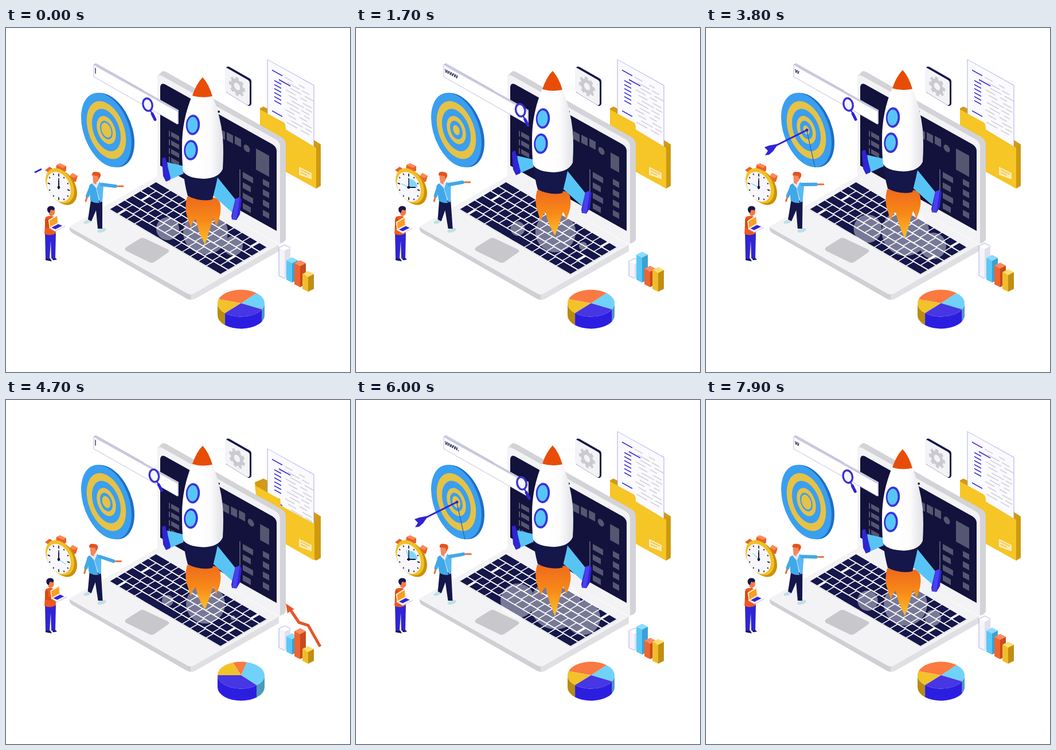
These frames come from a looping animation (600 px wide and 600 px high, 8 s). An HTML page with a canvas:

```html
<!DOCTYPE html>
<html lang="en">
<head>
<meta charset="utf-8">
<title>Launch</title>
<style>
html, body { margin: 0; width: 100%; height: 100%; overflow: hidden; background: #fff; }
canvas { display: block; width: 600px; height: 600px; }
</style>
</head>
<body>
<canvas id="stage" width="600" height="600"></canvas>
<script>
const g = document.getElementById('stage').getContext('2d');
const TAU = Math.PI * 2, NAVY = '#15164a', INDIGO = '#2f24d6';
const { sin, cos, min, max, abs, floor, ceil, sqrt } = Math;

const fill = (color, d) => { g.fillStyle = color; g.fill(new Path2D(d + 'Z')); };
function line(color, width, d) {
  g.strokeStyle = color;
  g.lineWidth = width;
  g.stroke(new Path2D(d));
}
function oval(color, x, y, rx, ry, turn = 0) {
  g.fillStyle = color;
  g.beginPath();
  g.ellipse(x, y, rx, ry, turn, 0, TAU);
  g.fill();
}
function within(matrix, draw) {
  g.save();
  g.transform(...matrix);
  draw();
  g.restore();
}
const shift = (x, y, draw) => within([1, 0, 0, 1, x, y], draw);

function smooth(u) {
  u = min(1, max(0, u));
  return u * u * (3 - 2 * u);
}
// Rises to 1 around a moment and falls back to 0 at distance w.
const bump = (t, at, w) => smooth(1.6 * (1 - abs(t - at) / w));
const mix = (a, b, u) => a + (b - a) * u;
// Two swings in four seconds that settle at the ends.
const wave = c => cos(Math.PI * (c - .85)) * sqrt(sin(c * TAU / 8));

function paper(y) {
  within([1, .555, 0, 1, 456, y], () => {
    g.fillStyle = '#fafaff';
    g.fillRect(0, 0, 81, 112);
    g.strokeStyle = '#9a94ea';
    g.lineWidth = .8;
    g.strokeRect(0, 0, 81, 112);
    const dash = (c, x, row, w) => { g.fillStyle = c; g.fillRect(x, row, w, 1.8); };
    dash(INDIGO, 8, 13, 18);
    dash(INDIGO, 20, 23, 20);
    dash(INDIGO, 8, 84, 18);
    for (let i = 0; i < 12; i++) {
      const row = 13 + i * 7, x = 30 + i * 5 % 13;
      dash('#cfcfd6', x, row, 14 + i * 7 % 9);
      dash('#cfcfd6', x + 25, row, 10 + i * 3 % 7);
      if (i > 1 && i < 8) dash(INDIGO, 12, row + 2, 12);
    }
  });
}

function folder(t) {
  const open = bump(t % 2, .85, .7);
  const x = -9 * open, y = 7 * open;
  fill('#d49a14', `M${443 + x} ${140 + y / 2}L449 137L457 141L460 146L549 203V275L541 280L443 225`);
  paper(55 + 30 * open);
  fill('#f6c526', `M${443 + x} ${142 + y}L${485 + x} ${165 + y}Q${488 + x} 167 ${488 + x} ${177 + y}L${541 + x / 3} ${209 + y}V280L443 226`);
  fill('#cd9a10', `M${541 + x / 3} ${209 + y}L549 204V275L541 280`);
  fill('#fbeab0', 'M511 242L533 253V264L511 256');
  line('#f0c444', 1.5, 'M514 247L530 255M514 252L525 257');
}

function gearTile(t) {
  fill(NAVY, 'M384 69Q386 66 390 68L425 88Q428 90 428 94V132Q427 136 423 136L384 112');
  fill('#f3f3f8', 'M382 72Q382 68 386 70L421 90Q425 92 425 96V132Q424 136 420 134L386 113Q382 110 382 106');
  within([.87, .45, 0, 1, 403, 102], () => {
    g.rotate(t * TAU / 16);
    g.fillStyle = '#cbcbcf';
    for (let i = 0; i < 8; i++) {
      g.fillRect(-3, -16, 6, 8);
      g.rotate(TAU / 8);
    }
    oval('#cbcbcf', 0, 0, 12.5, 12.5);
    oval('#f3f3f8', 0, 0, 6, 6);
  });
}

function screen(t) {
  fill('#12123c', 'M269 103Q270 95 277 98L465 203Q472 208 472 214V354L269 240');
  oval('#12123c', 371, 146, 2, 2);
  const s = bump(t % 4, 1.35, 1.3);
  within([1, .55, 0, 1, 269, 98], () => {
    g.fillStyle = '#55566f';
    const box = (x, y, w, h) => g.fillRect(x - 269, y - 98 - .55 * (x - 269), w, h);
    for (let i = 0; i < 3; i++) box(371 + 14 * i + 8 * s, 175 + 6.5 * i + 4.5 * s, 11, 14);
    oval('#55566f', 151 + 8 * s, 29, 5.5, 6);
    box(436 + 8 * s, 210 + 7 * s, 23 - 8 * s, 37 - 10 * s);
    for (let i = 0; i < 4; i++) {
      box(288, 181 + i * 15, 14, 8);
      box(284, 179 + i * 15, 2, 10);
      box(413, 251 + i * 18, i % 2 ? 14 : 18, 10);
      box(448, 263 + i * 18, 11, 10);
    }
    box(407, 246, 2, 50);
  });
}

function laptop(t) {
  fill('#cfcfd4', 'M111 347L322 464L476 377V389L330 472Q322 476 315 472L115 357Q111 354 111 351');
  fill('#e0e0e4', 'M322 464L476 377V389L330 472Q326 474 322 474');
  fill('#f3f3f5', 'M113 345L265 258L476 378L328 463Q322 466 316 463L113 349Q110 347 113 345');
  fill('#d3d3d8', 'M264 84L272 76Q275 74 280 77L480 190Q488 195 488 203V368Q488 373 478 376');
  fill('#f3f3f5', 'M264 88Q264 79 273 84L470 194Q478 199 478 208V378L264 258');
  screen(t);

  // Keyboard plane: x runs to the right, y to the front.
  within([194, 114, -82, 48, 262, 268], () => {
    g.fillStyle = '#d6d6dc';
    g.fillRect(0, 0, 1.005, 1.01);
    g.fillStyle = '#fff';
    g.fillRect(0, 0, 1, 1);
    g.fillStyle = NAVY;
    for (let r = 0; r < 6; r++) {
      for (let c = 0; c < 14; c++) {
        const x = c / 14 + (r % 3 - 1) * .012 * (c > 0 && c < 13);
        g.fillRect(x + .004, r / 6 + .013, .0635, .143);
      }
    }
    g.fillRect(.28, .846, .3, .143);
  });
  fill('#c8c8cc', 'M210 382L234 367Q238 365 242 367L282 386Q287 389 282 392L259 408Q254 411 249 408L210 389Q205 386 210 382');
}

function smoke(p) {
  const s = sin(p * TAU);
  g.fillStyle = '#ffffff6c';
  g.beginPath();
  for (const [x, y, r] of [[282, 350, 20 + 10 * s], [348, 356, 39 + 5 * s], [396, 380, 17 + 13 * s]]) {
    g.moveTo(x + r, y);
    g.arc(x, y, r, 0, TAU);
  }
  g.fill();
}

function searchBar(t) {
  const c = t % 4;
  fill('#c9c9dc', 'M153 64L156 62L301 143V167L299 168');
  fill('#fff', 'M153 65L299 146V168L153 85');
  line('#a5a2dc', .7, 'M299 168L153 85V64L157 62L240 109');
  const n = min(max(0, floor((c - .6) / .3)), ceil((4 - c) * 3));
  within([.88, .46, 0, 1, 155, 77], () => {
    g.fillStyle = NAVY;
    g.font = 'bold 11px "Liberation Sans", Arial, sans-serif';
    const text = 'www.'.slice(0, n);
    g.fillText(text, 0, 0);
    if (n == 0 || n == 3 && c >= 3) g.fillRect(g.measureText(text).width + .5, -8, 1.4, 10);
  });

  const x = 268 - 21 * cos(t * TAU / 4);
  g.lineCap = 'round';
  shift(x, 132 + ((x - 258) / 8.5) ** 2, () => {
    oval('#f4f6ff', 0, 0, 8, 11, -.25);
    g.strokeStyle = '#3a30d4';
    g.lineWidth = 3.4;
    g.stroke();
    line('#3a30d4', 2.5, 'M5 11L8 15');
    line(INDIGO, 5, 'M8 16L13 26');
  });
  g.lineCap = 'butt';
}

function target(p) {
  const pulse = cos(p * TAU);
  within([45, 22, 0, 61, 179, 178], () => oval('#1f6fc4', 0, 0, 1, 1));
  within([44, 22, 0, 61, 175, 178], () => {
    [1, .78, .57, .38, .25, .16 + .04 * pulse].forEach((r, i) =>
      oval(i % 2 ? '#e6c246' : '#3a9ff0', 0, 0, r, r));
  });

  const s = p * 8 / 3;
  if (s > 1.3) return;
  const tip = smooth(s / .25), tail = smooth(s / .32);
  const x = mix(45, 105, tail), y = mix(254, 213, tail);
  const tx = mix(62, 176, tip), ty = mix(246, 178, tip);
  if (tip > .9) line('#2468b8', 1.2, 'M176 180L190 243');
  line(INDIGO, 3, `M${x + 5} ${y - 2}L${tx} ${ty}`);
  oval(INDIGO, tx, ty, 2.5 * tip, 2.5 * tip);
  within([tail, 0, 0, tail, x, y], () => fill(INDIGO, 'M-3 -5L5 -8L21 -11L12 2L5 8L-2 9L3 1'));
}

function stopwatch(t) {
  const c = t % 4, a = .25 * bump(c, 2.3, 1.5);
  fill('#e8602c', 'M88 239L94 236L105 241V249L99 252L87 247M68 248L76 242L81 245L74 252M111 258L116 253L125 258L122 268L117 269');
  fill('#ff8a52', 'M88 239L94 236L105 241L99 244M111 258L116 253L125 258L119 262');
  within([25, 10, 0, 29, 99, 278], () => oval('#c99208', 0, 0, 1, 1));
  within([25, 10, 0, 29, 94, 275], () => oval('#f2c024', 0, 0, 1, 1));
  within([21, 7, 0, 25, 92, 277], () => {
    oval('#f7f7fb', 0, 0, 1, 1);
    g.fillStyle = NAVY;
    for (let i = 0; i < 12; i++) {
      g.fillRect(-.04, -.92, .08, i % 3 ? .1 : .2);
      g.rotate(TAU / 12);
    }
  });
  shift(92, 278, () => {
    g.fillStyle = '#7fd8f4';
    g.beginPath();
    g.moveTo(0, 0);
    g.arc(0, 0, 15, -TAU / 4, (a - .25) * TAU);
    g.fill();
    line('#4cc0ee', 1, `M0 0L${14 * sin(c * 3)} ${-17 * cos(c * 3)}`);
    line(NAVY, 1.5, 'M0 0V-16');
    g.rotate(a * TAU);
    line(NAVY, 2, 'M0 3V-12');
    oval(NAVY, 0, 0, 2.4, 2.4);
  });
}

function presenter(t) {
  const c = t % 4, lean = -2 - 4.5 * cos((c - 1.3) * TAU / 4), hand = 276 + 8 * wave(c);
  oval('#bfe0e4', 142, 338, 7, 3, -.3);
  oval('#bfe0e4', 167, 353, 8, 3.5, -.3);
  within([1, 0, -lean / 80, 1, lean * 340 / 80, 0], () => {
    fill(NAVY, 'M148 300L168 301L168 350L160 350L157 318L149 337L143 334');
    fill('#e8e8f2', 'M150 270L164 270L162 300L153 300');
    fill('#41a8e8', 'M150 271L157 279L163 305Q153 306 147 301L145 275');
    fill('#58b9f2', 'M163 268L170 275L168 303L164 304L158 280');
    g.lineCap = 'round';
    line('#41a8e8', 6, 'M149 275L142 293');
    line('#e8703c', 3, 'M141 296L139 302');
    line('#41a8e8', 6, `M167 273L191 ${hand}`);
    line('#e8703c', 3, `M195 ${hand}L204 ${hand}`);
    g.lineCap = 'butt';
    fill('#f3895e', 'M151 256L162 256V264Q160 269 158 269L157 273L152 270');
    fill('#e4531f', 'M150 256Q150 250 158 251Q166 251 165 258L162 264L160 258L150 257');
  });
}

function reader(t) {
  const x = 5 * wave(t % 4), y = -.8 * x;
  fill(NAVY, 'M69 399L77 402L80 407L69 405M79 399L86 401L89 404L82 405');
  fill(INDIGO, 'M68 357L87 356L86 402L79 402L78 371L76 403L69 402');
  fill('#ee5a1c', 'M69 330Q75 326 83 329L87 338V358Q78 364 67 359');
  shift(-x / 2, 0, () => {
    fill('#f07a4c', 'M75 316H85V323Q83 328 78 328L75 325');
    fill(NAVY, 'M72 315Q74 309 82 311L85 314L84 318L78 317L76 323Q71 320 72 315');
  });
  g.lineCap = 'round';
  line('#dc4914', 6, `M71 335L71 346L${81 + x / 2} ${348 + y / 2}`);
  g.lineCap = 'butt';
  shift(x, y, () => {
    fill('#f4f4fb', 'M75 348L91 340L103 346L86 355');
    fill(INDIGO, 'M79 348L91 342L98 345L86 351');
    fill('#fff0d8', 'M74 335L90 325L92 341L76 350');
    fill('#f6a028', 'M76 336L89 328L90 340L77 347');
    line('#b5b5d8', .8, 'M75 349L86 355L103 346');
  });
}

function bar(x, y, base, left, right, lid) {
  fill(left, `M${x - 10} ${y + 5}L${x} ${y + 10}V${base}L${x - 10} ${base - 5}`);
  fill(right, `M${x + 10} ${y + 5}L${x} ${y + 10}V${base}L${x + 10} ${base - 5}`);
  fill(lid, `M${x - 10} ${y + 5}L${x} ${y}L${x + 10} ${y + 5}L${x} ${y + 10}`);
}

function chart(t) {
  // The trend line grows toward its head, then its tail follows.
  const from = smooth((t % 2 - 1.2) / .55), to = smooth(t % 2 / .55);
  if (to > from) {
    g.setLineDash([93 * (to - from), 200]);
    g.lineDashOffset = -93 * from;
    line('#e4572a', 5, 'M548 430L527 393L511 388L494 363');
    g.setLineDash([]);
    if (to > .9 && from < .9) fill('#e4572a', 'M488 355L503 365L497 367L491 372');
  }
  const w = wave(t % 4), white = 388 - 15 * cos((t + .55) * TAU / 4);
  bar(486, white, 437, '#f4f4fa', '#e0e0ec', '#fff');
  line('#8d88dc', .7, `M486 437L476 432V${white + 5}L486 ${white}L496 ${white + 5}`);
  bar(499, 400 + 11 * w, 444, '#5ac8f6', '#3aa2d2', '#8adcff');
  bar(513, 405 - 11 * w, 452, '#ee6530', '#c94b1c', '#ff8a5c');
  bar(527, 424 + 8 * w, 460, '#efbd2c', '#c18e12', '#ffdc6a');
}

function slice(a, b, x, top, base, face, wall) {
  const rx = 41, ry = 23.5, lo = max(a, 0), hi = min(b, TAU / 2);
  if (hi > lo) {
    g.fillStyle = wall;
    g.beginPath();
    g.ellipse(x, top, rx, ry, 0, lo, hi);
    g.ellipse(x, base, rx, ry, 0, hi, lo, true);
    g.fill();
  }
  g.fillStyle = face;
  g.beginPath();
  g.moveTo(x, top);
  g.ellipse(x, top, rx, ry, 0, a, b);
  g.fill();
}

function pie(t) {
  const turn = bump(t % 4, .75, .75), lift = bump(t % 4, 2.95, .8);
  const blue = 2.32 + .82 * turn, yellow = 3.44 + .92 * turn;
  const orange = 5.43 - .47 * turn, cyan = .47 + .37 * turn;
  const x = 410 + 11 * lift, y = 480 - 11 * lift, base = 501 + lift;
  if (lift > 0) {
    const ex = x + 41 * cos(cyan), ey = y + 23.5 * sin(cyan);
    fill('#4a9cba', `M${x} ${y}L${ex} ${ey}V${ey + base - y}L${x} ${base}`);
  }
  slice(orange - TAU, cyan, x, y, base, '#70d2fa', '#4a9cba');
  slice(yellow, orange, 410, 480, 501, '#fa7a42', '#c85422');
  slice(blue, yellow, 410, 480, 501, '#f2c22a', '#b98c10');
  slice(cyan, blue, 410, 480, 501, '#4636e4', '#2c1ee0');
}

function gradient(x0, y0, x1, y1, ...colors) {
  const paint = g.createLinearGradient(x0, y0, x1, y1);
  colors.forEach((c, i) => paint.addColorStop(i / (colors.length - 1), c));
  return paint;
}

function rocket(p) {
  const tail = 378 + 6 * sin(p * TAU);
  shift(0, 6.8 * cos(p * TAU) - 6.8, () => {
    fill(gradient(0, 295, 0, tail, '#ee6a1c', '#f88a18', '#fcc02c'),
      `M316 294Q310 315 317 332Q319 340 323 348Q325 337 331 333Q334 352 347 ${tail}Q356 350 361 332Q366 338 366 347Q378 322 373 304Q368 294 358 296`);
    fill('#58c4f6', 'M281 234L311 241L312 253L285 265');
    fill(INDIGO, 'M272 229Q273 225 278 226L287 261L286 265L279 268L274 258');
    fill('#58c4f6', 'M366 257L400 299L397 324L360 291');
    fill(INDIGO, 'M400 298L408 295L411 299L408 325L402 335L394 334L393 328');
    fill('#4a40ec', 'M400 298L408 295L402 334L394 334');
    fill(NAVY, 'M309 246H372Q367 272 360 299Q340 304 317 293Q311 272 309 246');
    fill(gradient(308, 0, 380, 0, '#fff', '#fff', '#fcfcfd', '#e0e0e6'),
      'M325 117Q307 160 307 205Q307 235 309 250Q316 262 345 263Q371 262 378 246Q380 215 378 190Q374 153 360 118');
    fill('#e84d08', 'M343 86Q332 97 325 118Q342 123 360 119Q354 98 343 86');
    for (const [x, y] of [[326, 169], [322.5, 213]]) {
      oval('#3b32d8', x, y, 12.2, 17.8, .05);
      oval('#56c6f8', x - .5, y, 9, 14, .05);
    }
  });
}

function draw(now) {
  const t = floor(now % 8000 / 100) / 10;
  const p = t * 3 / 8 % 1;
  g.clearRect(0, 0, 600, 600);
  folder(t);
  gearTile(t);
  laptop(t);
  smoke(p);
  target(p);
  searchBar(t);
  stopwatch(t);
  presenter(t);
  reader(t);
  chart(t);
  pie(t);
  rocket(p);
}

let start;
function tick(now) {
  start ??= now;
  draw(now - start);
  requestAnimationFrame(tick);
}
draw(0);
requestAnimationFrame(tick);
</script>
</body>
</html>
```
